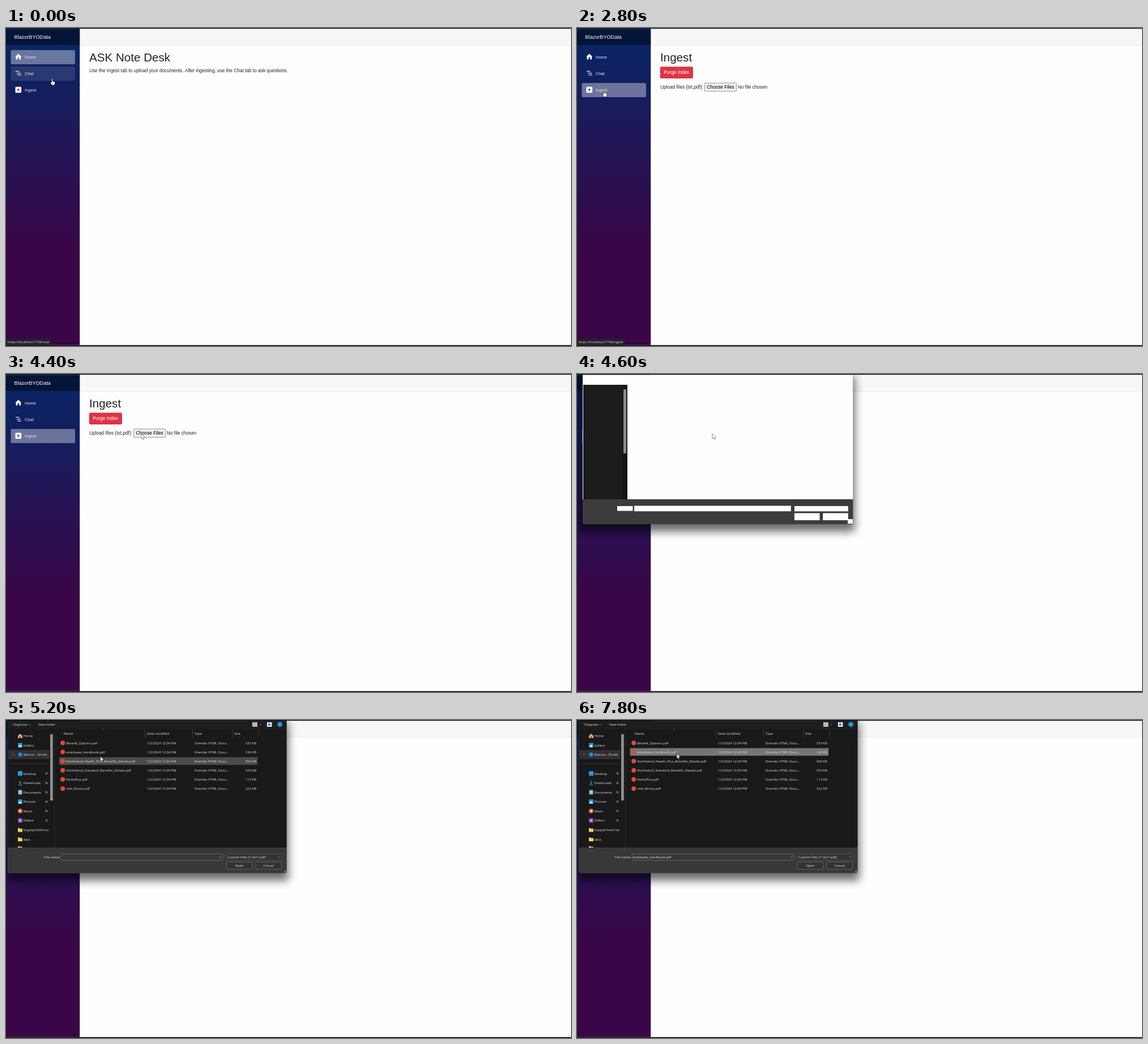
These frames come from a looping animation (998x561 px, 8000 ms). An HTML page:

```html
<!DOCTYPE html>
<html lang="en">
<head>
<meta charset="utf-8">
<title>Ingest demo</title>
<style>
html, body { margin: 0; width: 100%; height: 100%; overflow: hidden; background: #000; }
svg { display: block; width: 100%; height: 100%; }
text { white-space: pre; }
.web { font-family: "Liberation Sans", Arial, sans-serif; font-size: 8.28px; fill: #212529; }
.ui { font-family: "Open Sans", "Noto Sans", sans-serif; font-size: 5.92px; fill: #dedede; }
.nav { font-size: 7.5px; fill: #e2e2e6; }
.h1 { font-size: 20.6px; }
</style>
</head>
<body>
<svg id="stage" viewBox="0 0 998 561">
  <defs>
    <linearGradient id="side" x2="0" y2="1">
      <stop offset="0" stop-color="#052767"/>
      <stop offset=".7" stop-color="#3a0647"/>
    </linearGradient>
    <filter id="soft" x="-20%" y="-20%" width="140%" height="150%"><feGaussianBlur stdDeviation="8"/></filter>
    <clipPath id="screen"><rect y="1.5" width="998" height="558"/></clipPath>
    <clipPath id="tree"><rect x="3" y="16" width="73.5" height="209"/></clipPath>
  </defs>
  <g id="scene" clip-path="url(#screen)"></g>
</svg>
<script>
const LOOP = 8000, STEP = 200;
const $ = id => document.getElementById(id);

const rect = (x, y, w, h, fill, more = "") =>
  `<rect x="${x}" y="${y}" width="${w}" height="${h}" fill="${fill}" ${more}/>`;
const dot = (x, y, r, fill) => `<circle cx="${x}" cy="${y}" r="${r}" fill="${fill}"/>`;
const line = (d, stroke, w = 0.8, more = "") =>
  `<path d="${d}" fill="none" stroke="${stroke}" stroke-width="${w}" ${more}/>`;
const shape = (d, fill, more = "") => `<path d="${d}" fill="${fill}" ${more}/>`;
const label = (x, y, str, cls = "ui", more = "") => `<text x="${x}" y="${y}" class="${cls}" ${more}>${str}</text>`;
const group = (id, body, more = "") => `<g id="${id}" ${more}>${body}</g>`;
const frame = (x, y, w, h, fill, stroke, rx = 1) =>
  rect(x, y, w, h, fill, `stroke="${stroke}" stroke-width=".7" rx="${rx}"`);
const chevron = (x, y) => line(`M${x - 1.5} ${y - 0.7}l1.5 1.5l1.5-1.5`, "#bbb", 0.7);
const shadow = (right, bottom) =>
  rect(3, 4, right, bottom + 9, "#000", 'filter="url(#soft)" opacity=".58"');

// Web page
const navTop = [39, 68, 97];
const navIcons =
  shape("M16.6 50.6L21.8 45.6L27 50.6L26 51.3V55.4H23.2V51.8H20.4V55.4H17.6V51.3Z", "#fff") +
  line("M17 76.4H23.5M19 79.6H26M20.5 82.9H27", "#e8e8ec", 1.1) +
  rect(16.5, 103.7, 10.6, 10.6, "#fff", 'rx="1.2"') +
  line("M21.8 106.5V111.5M19.3 109H24.3", "#26265c", 1.1);

const page =
  rect(0, 0, 998, 561, "#fefefe") +
  rect(130, 0, 868, 30, "#f7f7f7") + rect(130, 30, 868, 0.6, "#dcdcdc") +
  rect(0, 0, 130.3, 561, "url(#side)") + rect(0, 0, 130.3, 30, "#000", 'opacity=".45"') +
  label(14.6, 19, "BlazorBYOData", "web", 'style="font-size:9.1px;fill:#fff"') +
  rect(8.5, 0, 113.5, 25, "#fff", 'id="active" rx="2" opacity=".38"') +
  rect(8.5, 0, 113.5, 25, "#fff", 'id="hover" rx="2" opacity=".11"') +
  navIcons +
  ["Home", "Chat", "Ingest"].map((s, i) => label(33, navTop[i] + 14.8, s, "web nav")).join("") +
  group("home",
    label(147, 58.8, "ASK Note Desk", "web h1") +
    label(147, 77.7, "Use the Ingest tab to upload your documents. After ingesting, use the Chat tab to ask questions.", "web")) +
  group("ingest",
    label(147, 58.8, "Ingest", "web h1") +
    rect(146.8, 68.3, 58.2, 20.6, "#dc3545", 'rx="2.6"') +
    label(153.3, 81.4, "Purge Index", "web", 'style="fill:#fff"') +
    label(147, 107.4, "Upload files (txt,pdf):", "web") +
    frame(225.6, 97, 56.2, 14.8, "#efefef", "#6a6a6a", 1.4) +
    label(229.4, 107.4, "Choose Files", "web", 'style="fill:#000"') +
    label(284, 107.4, "No file chosen", "web")) +
  group("status", rect(0, 549, 79, 11, "#222428", 'id="statusBox"') +
    label(2.6, 556.4, "", "ui", 'id="statusText"'));

// File dialog while it opens
const skeleton = group("skeleton",
  shadow(487.5, 265) +
  rect(10, -8, 477.5, 273, "#3c3c3c", 'rx="3.5"') +
  rect(10, 0, 477.5, 221, "#fefefe") +
  rect(11, 19, 78, 202, "#1c1c1d") + rect(80.5, 19, 8.5, 202, "#151515") + rect(82, 27, 5, 113, "#8b8b8b") +
  [[71, 233, 27.5, 8.5], [101, 232.5, 277, 9.7], [384, 233, 95, 9.3],
   [384, 245.5, 44.7, 12.5], [434.3, 245.5, 44.7, 12.5], [478.3, 256, 8.7, 8]]
    .map(b => rect(...b, "#fefefe")).join(""));

// File dialog
const ROW = 16.1, rowTop = i => 33.5 + ROW * i;
const files = [
  ["Benefit_Options.pdf", 533], ["employee_handbook.pdf", 140],
  ["Northwind_Health_Plus_Benefits_Details.pdf", 569],
  ["Northwind_Standard_Benefits_Details.pdf", 554],
  ["PerksPlus.pdf", 113], ["role_library.pdf", 222]
];
const fileRow = ([name, size], i) => {
  const y = rowTop(i) + 9.2;
  return dot(100.2, y - 2.3, 4, "#dc4a3d") + label(106.3, y, name) +
    label(249, y, "1/2/2024 12:04 PM") + label(333, y, "Drembo HTML Docu...") +
    label(442, y, size + " KB", "ui", 'text-anchor="end"');
};

const tile = (color, glyph = () => "") => y => rect(21, y - 4, 8, 8, color, 'rx="1"') + glyph(y);
const picture = tile("#2b8fdc", y => shape(`M22 ${y + 3}l3-4l3 4z`, "#fff"));
const folder = y => shape(`M21 ${y - 3.2}h3l1 1h4v5.6h-8z`, "#f5cf63");
const places = [
  ["Home", 28, y => shape(`M21 ${y}l4-4l4 4v4h-8z`, "#e9a06a") + rect(24, y + 1, 2, 3, "#7a4a32")],
  ["Gallery", 44.4, picture],
  ["Marcus - Orvelt", 61, y => dot(25, y, 3.6, "#1a8fe0")],
  ["Desktop", 94.3, tile("#1f9be0"), 1],
  ["Downloads", 111, y => line(`M25 ${y - 4}v5.6m-2.4-2.3l2.4 2.4l2.4-2.4M21.7 ${y + 3.6}h6.6`, "#35b3b0", 1), 1],
  ["Documents", 127.6, y => rect(21.5, y - 4, 7, 8, "#8ea9c2", 'rx=".8"') +
    line(`M23 ${y - 1.5}h4m-4 2h4`, "#fff", 0.8), 1],
  ["Pictures", 144.1, picture, 1],
  ["Music", 160.6, y => dot(25, y, 4, "#e8685c") + dot(25, y, 1.3, "#fff"), 1],
  ["Videos", 177.2, tile("#8c46c8", y => shape(`M24 ${y - 2}l3 2l-3 2z`, "#fff")), 1],
  ["SupplyChainCon", 194, folder], ["data", 210.5, folder], ["", 226, folder]
];
const pin = y => line(`M69 ${y + 2.3}l2-2m-1-2l3 3m-2.2-3.6l2.8 2.8m-2.6-2l-1 1.2m3.2 1l-1.2 1`, "#c4c4c4", 0.7);
const place = ([name, y, icon, pinned]) =>
  icon(y) + label(30.4, y + 2.2, name) + (pinned ? pin(y) : "");

const dialog = group("dialog",
  shadow(495.6, 270) +
  rect(3, -8, 492.6, 278, "#383838", 'rx="3.5" stroke="#484848" stroke-width=".5"') +
  rect(3.3, 0, 492, 225, "#191919") + rect(3.3, 0, 492, 16, "#1d1d1d") +
  group("places", rect(4, 53, 73, 16, "#303030") + line("M11.4 59l1.8 2l-1.8 2", "#999", 0.7) +
    line("M9 77.3H74", "#414141") + places.map(place).join(""), 'clip-path="url(#tree)"') +
  rect(78, 25, 4.8, 117, "#8e8e8e") + rect(85.5, 16, 0.7, 209, "#2d2d2d") +
  group("content",
    label(12.6, 10, "Organize") + chevron(41, 8) + label(57, 10, "New folder") +
    rect(435, 4, 9, 8, "#b9b9b9") + chevron(449.3, 8) +
    rect(461, 4, 8.5, 8, "#e8f1f8") + rect(463, 6, 4, 4, "#1682c8") +
    dot(483.7, 7.8, 4.6, "#1687d9") +
    label(483.7, 10, "?", "ui", 'text-anchor="middle" style="fill:#fff"') +
    line("M170 17.6l1.6-1.5l1.6 1.5", "#999", 0.6) +
    line("M245 16V30.5M329.5 16V30.5M400 16V30.5M446.3 16V30.5", "#4b4b4b", 0.7) +
    [["Name", 102], ["Date modified", 249], ["Type", 333], ["Size", 403]]
      .map(([s, x]) => label(x, 25.7, s)).join("") +
    rect(93.7, 0, 350.6, 13.4, "#4c4c4c", 'id="rowHover"') +
    rect(93.7, 0, 350.6, 13.4, "#757575", 'id="rowPick"') +
    files.map(fileRow).join("")) +
  label(95.3, 244.2, "File name:", "ui", 'text-anchor="end"') +
  frame(97.2, 236.5, 285.6, 11, "#373737", "#777") + chevron(378, 242) +
  label(98.3, 244.2, "", "ui", 'id="fileName"') +
  frame(388.6, 236.5, 99, 11, "#333", "#595959") +
  label(391, 244.2, "Custom Files (*.txt;*.pdf)") + chevron(482.5, 242) +
  frame(389.5, 250.6, 45.6, 12.8, "#333", "#777") + label(412, 259.2, "Open", "ui", 'text-anchor="middle"') +
  frame(441.2, 250.6, 45.6, 12.8, "#333", "#777") + label(464, 259.2, "Cancel", "ui", 'text-anchor="middle"') +
  line("M490.3 269l4.4-4.4M492.6 269l2.1-2.1", "#bbb", 0.8));

const pointers =
  shape("M0 0V9.4L2.1 7.4L3.5 10.4L4.9 9.8L3.6 6.8H6.4Z", "#fff", 'id="arrow" stroke-width=".7"') +
  shape("M-.9 .9Q0-.7 .9 .9V4.4L4.4 5.4Q5.2 5.8 5 7L4.2 11.2H-.6L-3 7.4Q-3.4 6 -2 6.3L-.9 7.3Z",
    "#fff", 'id="hand" stroke="#111" stroke-width=".6"');

$("scene").innerHTML = page + skeleton + dialog + group("cursor", pointers);

// [time, x, y] of the pointer tip
const track = [
  [0, 81.5, 89.5], [200, 100, 82], [400, 140, 62], [600, 190, 51], [800, 240, 58], [1000, 285, 76],
  [1200, 306, 88], [1600, 497, 81.8], [1800, 455, 90], [2000, 330, 105], [2200, 150, 119], [2400, 22, 125],
  [2600, 48, 110], [3200, 48, 110], [3400, 140, 120], [3600, 232, 126.3], [3800, 236, 115], [4000, 239, 105.3],
  [4800, 239, 105.3], [5000, 195, 80], [5200, 166.7, 64], [5400, 169, 59], [6000, 173, 56],
  [6200, 174.3, 47.8], [6400, 175, 42], [6800, 175, 43], [7200, 176, 54], [7800, 176.2, 59]
];

// Last value whose time has come
const at = (steps, t) => steps.filter(s => s[0] <= t).pop()[1];

function tip(t) {
  const i = track.findIndex(k => k[0] > t);
  if (i < 0) return track[track.length - 1].slice(1);
  const [t0, x0, y0] = track[i - 1], [t1, x1, y1] = track[i], p = (t - t0) / (t1 - t0);
  return [x0 + (x1 - x0) * p, y0 + (y1 - y0) * p];
}

const show = (id, on) => $(id).setAttribute("display", on ? "inline" : "none");
const moveTo = (id, y) => $(id).setAttribute("y", y);

function highlight(id, index, top) {
  show(id, index >= 0);
  if (index >= 0) moveTo(id, top(index));
}

function render(t) {
  const onIngest = t >= 2800, open = t >= 4800;
  show("home", !onIngest);
  show("ingest", onIngest);
  moveTo("active", navTop[onIngest ? 2 : 0]);
  highlight("hover", at([[0, 1], [400, -1], [2600, 2], [2800, -1]], t), i => navTop[i]);

  const link = at([[0, "chat"], [600, ""], [2600, "ingest"], [4000, ""]], t);
  show("status", link);
  $("statusText").textContent = "https://localhost:7156/" + link;
  $("statusBox").setAttribute("width", link === "chat" ? 79 : 84);

  show("skeleton", t >= 4600 && !open);
  show("dialog", open);
  show("content", t >= 5000);
  const pick = at([[0, -1], [6200, 1], [6400, 0], [7200, 1]], t);
  highlight("rowPick", pick, rowTop);
  highlight("rowHover", at([[0, -1], [5000, 3], [5200, 2], [5400, 1], [6200, -1]], t), rowTop);
  $("fileName").textContent = pick < 0 ? "" : files[pick][0];

  const hand = t < 400 || (t >= 2600 && t < 3400);
  show("hand", hand);
  show("arrow", !hand);
  $("arrow").setAttribute("stroke", open ? "#111" : "#666");
  $("cursor").setAttribute("transform", `translate(${tip(t)})`);
}

function tick(now) {
  render(Math.floor((now % LOOP) / STEP) * STEP);
  requestAnimationFrame(tick);
}
render(0);
requestAnimationFrame(tick);
</script>
</body>
</html>
```
